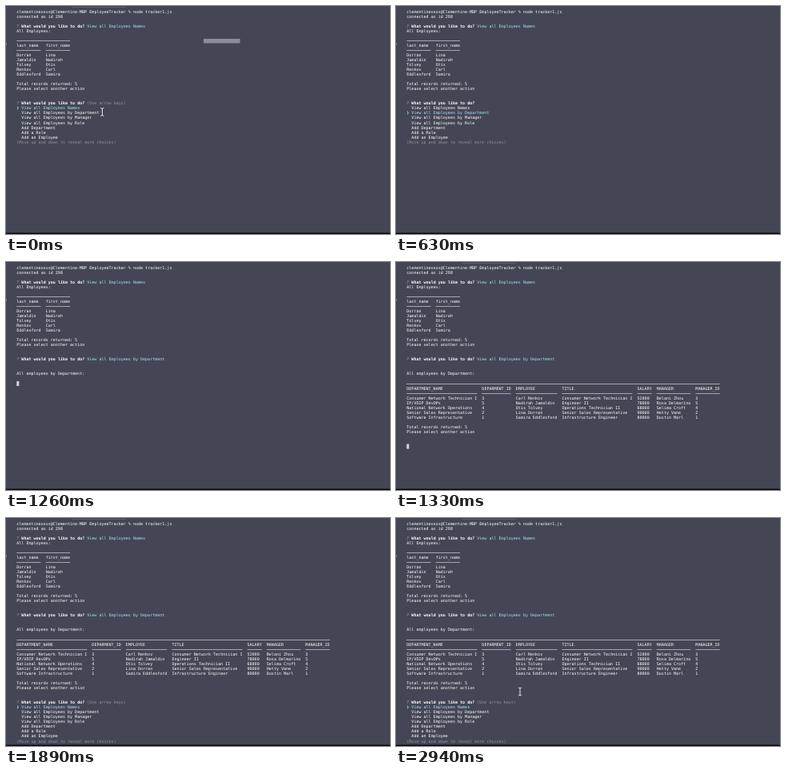
An HTML page with a canvas that plays this animation: 480x285 px, repeating every 3010 ms.

```html
<!DOCTYPE html>
<html lang="en">
<head>
<meta charset="utf-8">
<title>Employee tracker terminal</title>
<style>
  html, body { margin: 0; width: 100%; height: 100%; overflow: hidden; background: #454655; }
  canvas { display: block; width: 480px; height: 285px; }
</style>
</head>
<body>
<canvas id="stage" width="480" height="285"></canvas>
<script>
const ctx = document.getElementById('stage').getContext('2d');
const LOOP = 3010, STEP = 70;
const LEFT = 13.3, CELL = 3.034, ROW = 6.045, BASE = 8.5;
const FONT = '5.04px "DejaVu Sans Mono", monospace';
const WHITE = '#ffffff', CYAN = '#a0e9f8', GRAY = '#92939d', MARK = '#a9b5ae';

const QUESTION = 'What would you like to do?';
const CHOICES = [
  'View all Employees Names', 'View all Employees by Department',
  'View all Employees by Manager', 'View all Employees by Role',
  'Add Department', 'Add a Role', 'Add an Employee'
];
const NAMES = {
  widths: [10, 10],
  head: ['last_name', 'first_name'],
  rows: [
    ['Dorran', 'Lina'], ['Jamaldin', 'Nadirah'], ['Tolvey', 'Otis'],
    ['Renkov', 'Carl'], ['Eddlesford', 'Samira']
  ]
};
const STAFF = {
  widths: [29, 12, 17, 29, 6, 14, 10],
  head: ['DEPARTMENT_NAME', 'DEPARMENT_ID', 'EMPLOYEE', 'TITLE', 'SALARY', 'MANAGER', 'MANAGER_ID'],
  rows: [
    ['Consumer Network Technician I', '3', 'Carl Renkov', 'Consumer Network Technician I', '52000', 'Belani Zhou', '3'],
    ['IP/VOIP DevOPs', '5', 'Nadirah Jamaldin', 'Engineer II', '78000', 'Rosa Delmarino', '5'],
    ['National Network Operations', '4', 'Otis Tolvey', 'Operations Technician II', '68000', 'Selima Croft', '4'],
    ['Senior Sales Representative', '2', 'Lina Dorran', 'Senior Sales Representative', '90000', 'Hetty Vane', '2'],
    ['Software Infrastructure', '1', 'Samira Eddlesford', 'Infrastructure Engineer', '80000', 'Dustin Marl', '1']
  ]
};

function rect(x, y, w, h, color) {
  ctx.fillStyle = color;
  ctx.fillRect(x, y, w, h);
}

// Words are placed on the terminal's character grid.
function print(row, col, text, color = WHITE, bold = false) {
  ctx.font = (bold ? 'bold ' : '') + FONT;
  ctx.fillStyle = color;
  for (const word of text.matchAll(/\S+/g)) {
    ctx.fillText(word[0], LEFT + (col + word.index) * CELL, BASE + row * ROW);
  }
}

function rule(row, col, length) {
  rect(LEFT + col * CELL, Math.round(BASE + row * ROW - 2), length * CELL, 1, '#a5a6af');
}

function table(row, { widths, head, rows }) {
  let col = 0;
  widths.forEach((width, i) => {
    print(row + 1, col, head[i]);
    rule(row + 2, col, width);
    rows.forEach((cells, r) => print(row + 3 + r, col, cells[i]));
    col += width + 2;
  });
  rule(row, 0, col - 2);
  print(row + rows.length + 4, 0, 'Total records returned: 5');
  print(row + rows.length + 5, 0, 'Please select another action');
}

function ask(row, note = '', color = GRAY) {
  print(row, 0, '?', MARK);
  print(row, 2, QUESTION, WHITE, true);
  print(row, 29, note, color);
}

function menu(row, selected, hint) {
  ask(row, hint ? '(Use arrow keys)' : '');
  CHOICES.forEach((choice, i) => {
    const active = i === selected;
    if (active) print(row + 1 + i, 0, '❯', '#d4f5fb');
    print(row + 1 + i, 2, choice, active ? CYAN : WHITE);
  });
  print(row + 8, 0, '(Move up and down to reveal more choices)', GRAY);
}

function block(row) {
  rect(LEFT, BASE + row * ROW - 4.6, CELL, 6, '#d3d3da');
}

function beam(x, y) {
  ctx.beginPath();
  ctx.moveTo(x - 2, y - 5);
  ctx.quadraticCurveTo(x, y - 5, x, y - 3.5);
  ctx.lineTo(x, y + 3.5);
  ctx.quadraticCurveTo(x, y + 5, x - 2, y + 5);
  ctx.moveTo(x + 2, y - 5);
  ctx.quadraticCurveTo(x, y - 5, x, y - 3.5);
  ctx.moveTo(x + 2, y + 5);
  ctx.quadraticCurveTo(x, y + 5, x, y + 3.5);
  ctx.strokeStyle = 'rgba(20,20,28,.55)';
  ctx.lineWidth = 2;
  ctx.stroke();
  ctx.strokeStyle = WHITE;
  ctx.lineWidth = 1;
  ctx.stroke();
}

function pointer(t) {
  if (t < 140) return beam(120.3, 132.5);
  if (t < 2100) return;
  const u = Math.min(1, (t - 2100) / 490);
  beam(122.5 + 32.5 * u, 136 + 81 * u * u * (3 - 2 * u));
}

function history() {
  print(0, 0, 'clementinevoss@Clementine-MBP EmployeeTracker % node tracker1.js');
  print(1, 0, 'connected as id 298');
  ask(3, CHOICES[0], CYAN);
  print(4, 0, 'All Employees:');
  table(6, NAMES);
}

function result(t) {
  ask(19, CHOICES[1], CYAN);
  if (t < 1260) return block(20);
  print(22, 0, 'All employees by Department:');
  if (t < 1330) return block(24);
  table(24, STAFF);
  if (t < 1400) return block(37);
  menu(37, 0, true);
}

function draw(t) {
  rect(0, 0, 480, 285, '#454655');
  rect(0, 46, 1, 3, '#777884');
  if (t < 630 || t >= 1330) rect(83, 1, 67, 1, '#5c5d6a');
  history();
  if (t < 1190) menu(19, t < 140 ? 0 : 1, t < 140);
  else result(t);
  if (t < 140) rect(247, 41, 45.5, 5.5, '#8c8d98');
  rect(0, 283.5, 480, 1.5, '#08080d');
  pointer(t);
}

ctx.textRendering = 'geometricPrecision';
const start = performance.now();
function tick() {
  const t = (performance.now() - start) % LOOP;
  draw(Math.floor(t / STEP) * STEP);
  requestAnimationFrame(tick);
}
tick();
</script>
</body>
</html>
```
